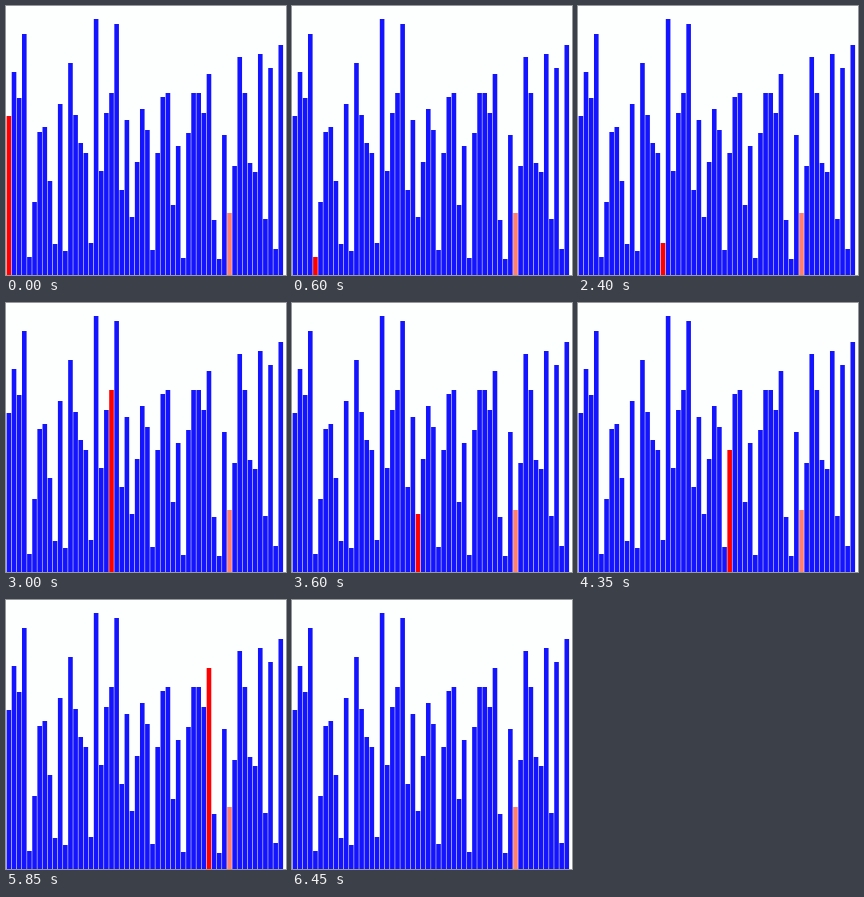
These frames come from a looping animation (280x269 px, 9450 ms). A matplotlib script:

```python
import matplotlib.pyplot as plt
from matplotlib.animation import FuncAnimation

W, H, DPI = 280, 269, 64
STEP_MS, FRAMES = 150, 63
PITCH, LEFT, BAR_W = 5.13, 0.6, 4.6
BACK, BLUE, RED, SALMON = "#fdfefe", "#1414ff", "#ff0000", "#ff8070"
FOUND = 43

# top edge of each bar, in pixels from the top of the stage
TOPS = [110, 66, 92, 28, 251, 196, 126, 121, 175, 238, 98, 245, 57, 109,
        137, 147, 237, 13, 165, 107, 87, 18, 184, 114, 211, 156, 103, 124,
        244, 147, 91, 87, 199, 140, 252, 127, 87, 87, 107, 68, 214, 253,
        129, 207, 160, 51, 87, 157, 166, 48, 213, 62, 243, 39]

fig = plt.figure(figsize=(W / DPI, H / DPI), dpi=DPI, facecolor=BACK)
ax = fig.add_axes([0, 0, 1, 1])
ax.axis("off")

lefts = [LEFT + PITCH * i for i in range(len(TOPS))]
bars = ax.bar(lefts, [H - top for top in TOPS], width=BAR_W, align="edge",
              color=BLUE, linewidth=0, snap=False)
ax.set_xlim(0, W)
ax.set_ylim(0, H)


def draw(step):
    """Linear search: the cursor walks right until it reaches the match."""
    for i, bar in enumerate(bars):
        bar.set_facecolor(BLUE)
    bars[FOUND].set_facecolor(SALMON)
    if step < FOUND:
        bars[step].set_facecolor(RED)
    return list(bars)


anim = FuncAnimation(fig, draw, frames=FRAMES, interval=STEP_MS,
                     init_func=lambda: draw(0), repeat=True, repeat_delay=0)
plt.show()
```
